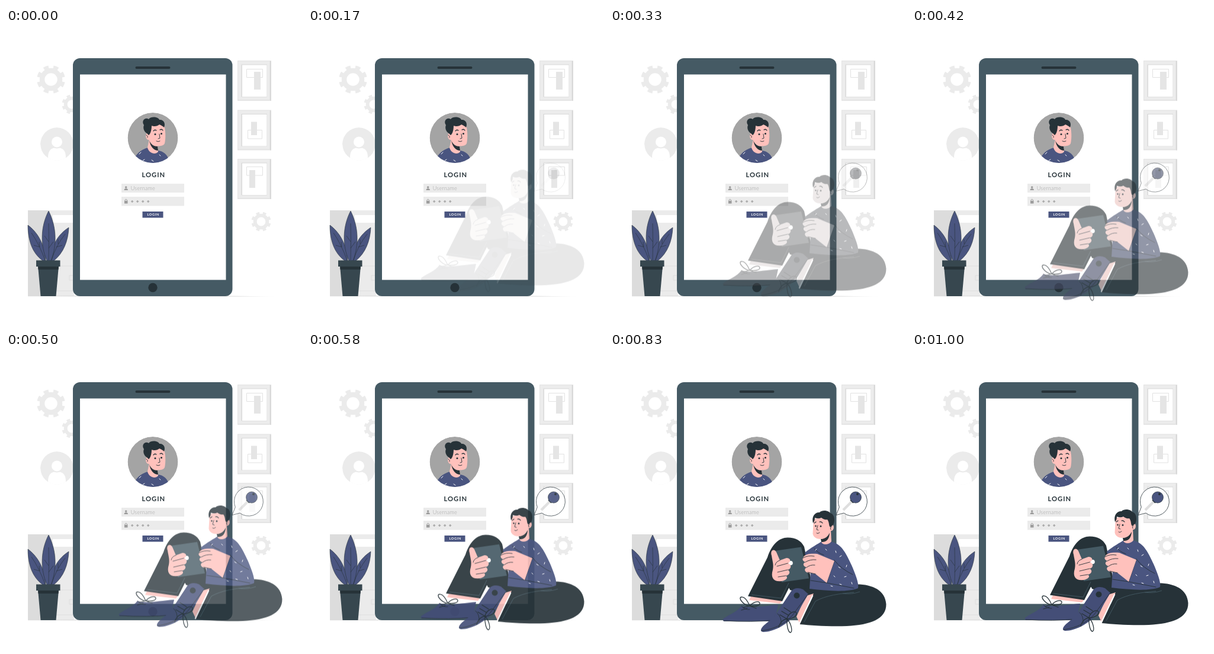
An HTML page for the animation above (1.04 s loop, 500 px wide and 500 px high).

```html
<!DOCTYPE html>
<html lang="en">
<head>
<meta charset="utf-8">
<title>Login</title>
<style>
html, body { margin: 0; width: 100%; height: 100%; overflow: hidden; background: #fff; }
svg { display: block; width: 100vw; height: 100vh; }
text { font-family: Lato, sans-serif; }
.line { fill: none; stroke: #263238; stroke-width: .9; stroke-linecap: round; stroke-linejoin: round; }
.seam { fill: none; stroke: #455a64; stroke-width: .9; }
.brow { stroke-width: 1.3; }
.lace { stroke-width: 1.3; }
.pale { fill: #ebebeb; }
.navy { fill: #4a5580; }
.shoe { fill: #444e77; }
.dark { fill: #263238; }
.slate { fill: #455a64; }
.skin { fill: #ffc1bc; }
.white { fill: #fff; }
.dash { fill: none; stroke: #fff; stroke-width: 1; stroke-linecap: round; }
#person { animation: drop 1040ms infinite, tint 1040ms linear infinite; }
#bubble { animation: fade 1040ms infinite, tint 1040ms linear infinite; }
@keyframes drop {
  0% { opacity: 0; transform: translateY(-30px); animation-timing-function: cubic-bezier(.36, -.01, .5, 1.38); }
  93%, 100% { opacity: 1; transform: none; }
}
@keyframes fade {
  0% { opacity: 0; animation-timing-function: cubic-bezier(.36, -.01, .5, 1.38); }
  93%, 100% { opacity: 1; }
}
@keyframes tint {
  0%, 33% { filter: grayscale(.85); }
  46%, 100% { filter: grayscale(0); }
}
</style>
</head>
<body>
<svg viewBox="0 0 500 500">
  <defs>
    <g id="gear" fill="none" stroke="#ebebeb">
      <circle r="15" stroke-width="8.5"/>
      <circle r="20.7" stroke-width="6.5" pathLength="16" stroke-dasharray="1 1" stroke-dashoffset="-.5"/>
    </g>
    <g id="frame">
      <path fill="#e4e4e4" d="M0 0H57V68H0Z"/>
      <path fill="#ececec" d="M1 1H54V66H1Z"/>
      <path fill="#d9d9d9" d="M55 1H57V68H55ZM6.500 6.500H50V61.500H6.500Z"/>
      <path class="white" d="M8 7.500H49.500V61H8Z"/>
    </g>
    <clipPath id="disc"><circle cx="248" cy="185.500" r="42.500"/></clipPath>
    <clipPath id="badge"><circle cx="86" cy="196" r="28"/></clipPath>
    <linearGradient id="floor">
      <stop offset="0" stop-color="#ddd"/><stop offset=".85" stop-color="#bbb"/><stop offset="1" stop-color="#eee"/>
    </linearGradient>
  </defs>

  <!-- Room -->
  <use href="#gear" x="76" y="87"/>
  <use href="#gear" transform="translate(111 129) scale(.69)"/>
  <use href="#gear" transform="translate(431 327) scale(.69)"/>
  <g clip-path="url(#badge)">
    <circle class="pale" cx="86" cy="196" r="28"/>
    <path class="white" d="M71 225V218Q71 202 86 202T101 218V225Z"/>
    <circle class="pale" cx="86" cy="192.500" r="11"/>
    <circle class="white" cx="86" cy="192.500" r="9"/>
  </g>
  <path class="pale" d="M37 308H115V453H37Z"/>
  <path fill="#dcdcdc" d="M37 308H71V453H37Z"/>
  <path class="white" d="M79 316H115V329H79Z"/>
  <path fill="none" stroke="#dedede" d="M80 402H114M80 444H114M114 418H107V426H114"/>
  <path fill="url(#floor)" d="M37 452.500L250 452L455 453.200L250 453.600L37 453.300Z"/>
  <use href="#frame" x="391" y="55"/>
  <use href="#frame" x="391" y="138.500"/>
  <use href="#frame" x="391" y="221"/>
  <path fill="none" stroke="#e2e2e2" d="M406.500 69.500H433.500V83.500H406.500ZM408.500 172.500H432.500V187H408.500ZM406.500 234.500H433.500V249H406.500Z"/>
  <path fill="#e5e5e5" d="M419 74H430V104H419ZM414 158.500H424V181H414ZM411 240H421V270H411Z"/>

  <!-- Plant -->
  <g stroke="#263238" stroke-width=".6">
    <path class="navy" d="M67 393C65 364 53 345 37 333C37 358 44 380 62 393Z"/>
    <path class="navy" d="M75 393C77 365 89 348 106 337C105 360 97 380 81 393Z"/>
    <path class="navy" d="M69 393C58 367 58 336 72 309C86 337 86 367 76 393Z"/>
    <path fill="none" d="M72 330Q73 360 72 392M43 346Q56 365 66 392M100 348Q84 368 77 392M72 361L65 351M72 372L80 361M57 370L47 367M57 370L56 361M85 370L95 367M88 365L88 357"/>
  </g>
  <path fill="#37474f" d="M54 402H89L84.500 453H58.500Z"/>
  <path class="dark" d="M54 402H89L88.500 408H54.500Z"/>
  <path fill="#37474f" d="M51 392.500H91.500V403H51Z"/>

  <!-- Device -->
  <rect class="slate" x="113" y="51" width="269.500" height="402" rx="12"/>
  <path class="white" d="M125 78.500H371.500V425.500H125Z"/>
  <rect class="dark" x="218.500" y="65" width="59" height="4" rx="2"/>
  <circle class="dark" cx="248" cy="438.500" r="7.700"/>

  <!-- Avatar -->
  <g clip-path="url(#disc)">
    <circle cx="248" cy="185.500" r="42.500" fill="#a4a4a4"/>
    <path class="navy" d="M214 228C219 212 227 206 240 202L256 207C266 208 273 213 277 228Z"/>
    <path class="skin" d="M242 188L239 202C242 213 253 214 257 209L256 198Z"/>
    <path class="dark" d="M242 190C245 197 250 200 256 200L257 207C249 207 244 200 242 190Z"/>
    <path class="skin" d="M242 166L266 162C270 171 270 187 268 195C265 201 252 201 246 194L242 189C236 190 234 180 239 177Z"/>
    <path class="dark" d="M238 178C233 175 231 169 233 164C228 157 235 150 241 154C246 148 258 151 259 155C266 154 270 161 267 168C265 166 262 164 259 163C256 166 250 167 246 165C246 170 245 178 241 181Z"/>
    <circle class="dark" cx="252" cy="179.500" r="1.500"/>
    <circle class="dark" cx="262.500" cy="178.500" r="1.500"/>
    <path class="line brow" d="M249 174Q251 171 254 173M260 172Q263 170 265 173"/>
    <path class="line" d="M259 179L260 186L257 187M254 191Q257 193 260 191M237 181Q240 182 239 185"/>
    <path class="dash" d="M225 213L228 210M246 223L249 225M259 214L261 216M234 222L231 224"/>
  </g>

  <!-- Form -->
  <text x="229.500" y="251.800" font-size="11.200" font-weight="700" letter-spacing="1" fill="#263238">LOGIN</text>
  <path class="pale" d="M195 263H301V278H195ZM195 285H301V300.500H195Z"/>
  <g fill="#9c9c9c">
    <circle cx="202.700" cy="269" r="1.800"/>
    <path d="M199.500 274Q199.500 271 202.700 271T206 274ZM200 292H205.500V296.500H200Z"/>
    <path fill="none" stroke="#9c9c9c" d="M201 292V290.500Q202.750 288 204.500 290.500V292"/>
  </g>
  <text x="210.800" y="273.800" font-size="9" font-weight="300" letter-spacing=".25" fill="#a2a2a2">Username</text>
  <path stroke="#a8a8a8" stroke-width="4" stroke-dasharray="1.400 7.600" d="M212.500 293H244"/>
  <path stroke="#a8a8a8" stroke-width="1.400" stroke-dasharray="4 5" d="M211.200 293H243"/>
  <path class="navy" d="M230.500 310H265.500V320.500H230.500Z"/>
  <text x="238.500" y="317" font-size="5.500" font-weight="700" letter-spacing=".65" fill="#fff">LOGIN</text>

  <!-- Thought -->
  <g id="bubble">
    <path class="white" stroke="#263238" stroke-width=".8" stroke-linejoin="round" d="M382 275.500L387.300 262A24.500 24.500 0 1 1 395 272Z"/>
    <path stroke="#dedede" stroke-width="4.500" d="M410 251L394 267"/>
    <path stroke="#263238" stroke-width="1.500" d="M406 250L411 255"/>
    <circle class="navy" cx="415" cy="245.500" r="9.500" stroke="#263238" stroke-width=".7"/>
    <circle class="dark" cx="418" cy="240" r="2"/>
  </g>

  <g id="person">
    <!-- Legs -->
    <path class="skin" d="M238 411L291 418L287 423L235 417Z"/>
    <path class="shoe" d="M191 449C201 441 214 438 222 427C237 432 258 427 284 425L278 453H194Q190 453 191 449Z"/>
    <path class="line" d="M192 452Q240 455 278 451M222 427Q228 434 236 433"/>
    <path class="line lace" d="M234 427C224 424 216 413 222 412C228 411 233 420 236 427C242 420 251 418 253 422C254 427 244 428 236 427M235 427L225 430M236 427L247 431M232 431L222 434"/>
    <path class="dark" d="M298 386L336 390L352 400L344 412L304 400Z"/>
    <path class="skin" d="M331 410L344 406L321 458L315 445Z"/>
    <path class="dark" d="M338 398C370 402 388 393 406 391C438 388 465 398 466.500 424C467 449 440 459 400 461C370 462 340 460 320.500 458L345 406Z"/>
    <path stroke="#fff" stroke-width="2" d="M342.500 409L319.500 457.500"/>
    <path class="seam" d="M328 454L347 419C365 409 389 406 412 404M393 406Q408 408 422 403"/>
    <path class="dark" d="M233 410.500L266 345C273 323 286 311.500 300 311.500C314 311.500 323 317 328 327L343 398L302 397L291 419Z"/>
    <path class="seam" d="M239 408L289 414L302 388"/>
    <path class="shoe" d="M255 467C258 458 272 453 281 440L306 402C311 396 319 396 326 399L335 407L317 438L308 447C296 460 275 471 259 471Q254 470 255 467Z"/>
    <circle class="dark" cx="315.500" cy="409.500" r="5"/>
    <path class="line" d="M256 469C279 466 297 456 308 443L334 408M283 440Q290 446 289 457"/>
    <path class="line lace" d="M299 448C302 438 313 434 315 439C316 445 307 449 299 449C291 450 286 457 285 463M299 449C306 456 309 470 305 472C301 472 298 459 299 449M299 449L287 442M302 443L290 436M305 437L294 430"/>

    <!-- Body -->
    <path class="navy" d="M329 337C340 328 350 323 359 317L376 319C392 323 400 341 408 358C414 372 421 389 419 397C402 404 370 402 337 398L339 368Z"/>
    <path class="line" d="M339 384L366 388L412 397M379 350L366 388M379 350Q391 365 410 374M345 330Q350 337 361 341"/>
    <path class="dash" d="M364 331L366 333M381 334L382 337M388 344L391 342M400 358L399 361M386 361L389 363M378 376L380 378M396 378L399 377M408 387L409 390M373 393L376 394M391 391L388 390M347 333L349 331"/>

    <!-- Hands and slate -->
    <path class="dark" d="M274 334L320 327.500L324 328L336.500 381L288 388Z"/>
    <path class="slate" d="M278 334L323 327.500L336 380.500L290 387Z"/>
    <circle class="white" cx="305" cy="354.500" r="3.800"/>
    <path class="skin" d="M273 342C270 333 277 329 281 336L287 350L298 346C306 346 306 353 300 355C308 357 306 365 300 366C306 369 303 375 297 376C302 379 297 384 290 385C276 387 271 379 275 366C277 357 274 350 273 342Z"/>
    <path class="line" d="M287 350Q280 352 279 358M300 355L282 360M300 366L283 370M297 376L284 378"/>
    <path class="skin" d="M326 346C328 339 340 338 350 339L379 351L366 388L347 373L334 371C328 369 328 364 332 362C326 360 325 355 330 353C325 351 325 348 326 346Z"/>
    <path class="line" d="M330 353Q338 348 348 349M332 362Q338 357 346 358M334 370L347 373M326 346Q334 341 345 343"/>

    <!-- Head -->
    <path class="skin" d="M359 309L357 319C359 325 370 324 374 318L373 298Z"/>
    <path class="dark" d="M356 314C363 314 368 310 371 303C371 314 365 320 357 319Z"/>
    <path class="skin" d="M344 280L342.500 305C344 314 356 316 363 312C368 309 371 304 372 300C379 302 380 289 374 289L370 277Z"/>
    <path class="dark" d="M343 287C340 277 346 268 354 269C359 264 369 266 372 270C379 272 381 282 377 290L372 294C369 291 371 286 367 281C363 282 360 280 357 278C353 280 348 279 346 278C346 282 345 285 343 287Z"/>
    <circle class="dark" cx="347.500" cy="292" r="1.300"/>
    <circle class="dark" cx="356" cy="292.500" r="1.400"/>
    <path class="line brow" d="M345 287L348 285M354 285Q357 284 359 287"/>
    <path class="line" d="M351 291L349 298L352 299M349 304Q351 306 354 303M374 293Q371 295 373 298"/>
  </g>
</svg>
</body>
</html>
```
